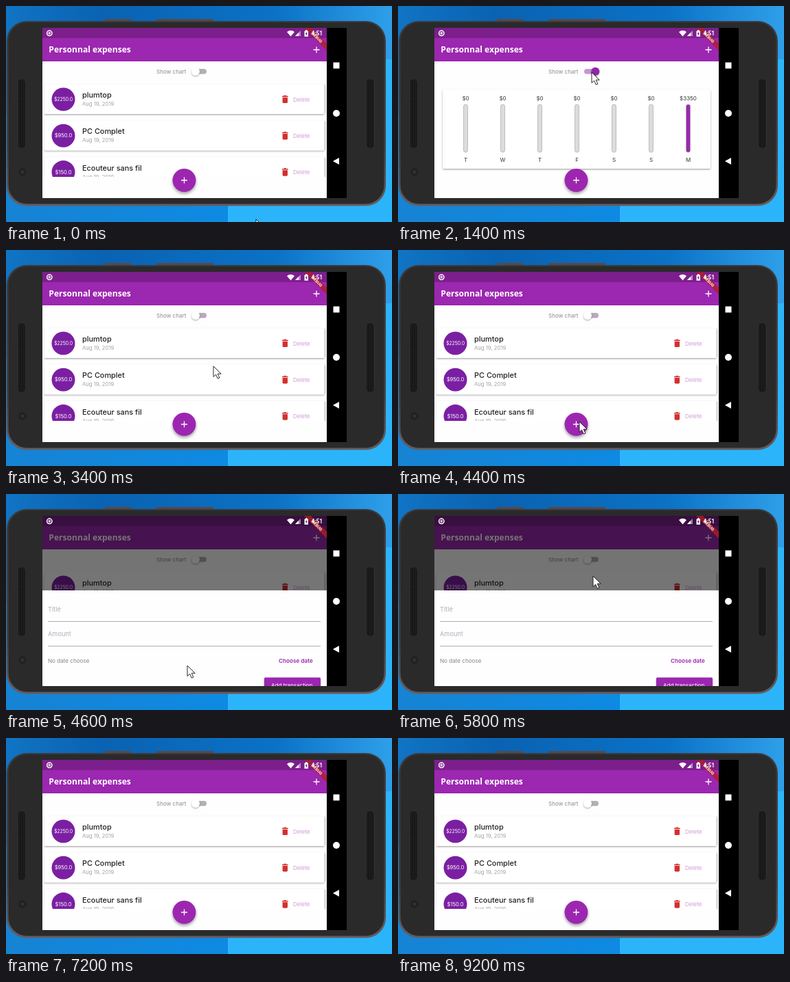
These frames come from a looping animation (562 by 316 pixels, 9.8 s). An HTML page:

```html
<!DOCTYPE html>
<html lang="en">
<head>
<meta charset="utf-8">
<title>Expense tracker demo</title>
<style>
  html, body { margin: 0; width: 100%; height: 100%; overflow: hidden; background: #0a6fc4; }
  svg { display: block; width: 100vw; height: 100vh; font-family: Inter, "Open Sans", sans-serif; }
</style>
</head>
<body>
<svg viewBox="0 0 562 316" xmlns="http://www.w3.org/2000/svg">
  <defs>
    <linearGradient id="skyTop" x1="0" y1="0" x2="1" y2="0">
      <stop offset="0" stop-color="#1174c4"/>
      <stop offset=".25" stop-color="#0a62b2"/>
      <stop offset=".7" stop-color="#0b72c6"/>
      <stop offset="1" stop-color="#2f9fe9"/>
    </linearGradient>
    <linearGradient id="skyBottom" x1="0" y1="0" x2="1" y2="0">
      <stop offset="0" stop-color="#1783d3"/>
      <stop offset=".6" stop-color="#0d8ae3"/>
    </linearGradient>
    <linearGradient id="rim" x1="0" y1="0" x2="0" y2="1">
      <stop offset="0" stop-color="#3b393a"/>
      <stop offset=".7" stop-color="#474445"/>
      <stop offset="1" stop-color="#665c60"/>
    </linearGradient>
    <pattern id="mesh" width="3" height="3" patternUnits="userSpaceOnUse">
      <rect width="3" height="3" fill="#171717"/>
      <circle cx="1.5" cy="1.5" r=".7" fill="#292929"/>
    </pattern>
    <filter id="soft" x="-30%" y="-30%" width="160%" height="170%">
      <feDropShadow dx="0" dy="1.2" stdDeviation="1.1" flood-color="#000" flood-opacity=".36"/>
    </filter>
    <filter id="deep" x="-40%" y="-40%" width="180%" height="190%">
      <feDropShadow dx="0" dy="2.5" stdDeviation="2.2" flood-color="#000" flood-opacity=".38"/>
    </filter>
    <clipPath id="screen"><rect x="53" y="32" width="414" height="249"/></clipPath>
    <clipPath id="listArea"><rect x="53" y="110" width="414" height="140"/></clipPath>
  </defs>

  <!-- desktop -->
  <rect width="562" height="158" fill="url(#skyTop)"/>
  <rect y="158" width="562" height="158" fill="url(#skyBottom)"/>
  <rect x="323" y="78" width="240" height="240" fill="#2cb4fa"/>

  <!-- phone -->
  <g fill="#56494b">
    <rect x="144" y="19" width="38" height="5" rx="1"/>
    <rect x="219" y="19" width="83" height="5" rx="1"/>
  </g>
  <rect x="1" y="22" width="552" height="270.500" rx="29" fill="url(#rim)"/>
  <rect x="3.500" y="24" width="547" height="265.500" rx="27" fill="#2b2a2a"/>
  <rect x="18.500" y="108" width="8.500" height="99" rx="3" fill="url(#mesh)" stroke="#151515"/>
  <rect x="526" y="108" width="8.500" height="99" rx="3" fill="url(#mesh)" stroke="#151515"/>
  <circle cx="24" cy="243" r="5" fill="#242424" stroke="#1c1c1c"/>
  <circle cx="24" cy="243" r="2" fill="#35343a"/>
  <rect x="53" y="32" width="443" height="249" fill="#000"/>
  <g fill="#fff">
    <rect x="476.500" y="82.500" width="9" height="9"/>
    <circle cx="481" cy="157" r="5"/>
    <path d="M476 227l9-5v10z"/>
  </g>

  <g clip-path="url(#screen)">
    <rect x="53" y="32" width="414" height="249" fill="#fefefe"/>

    <text x="219" y="98.800" font-size="8.100" fill="#8a8a8a">Show chart</text>
    <rect id="track" x="271" y="92" width="21" height="7.600" rx="3.800"/>
    <circle id="thumb" cy="95.800" r="6" filter="url(#soft)"/>

    <g id="list" clip-path="url(#listArea)"></g>
    <g id="chart">
      <rect x="65" y="122" width="390" height="116" rx="2" fill="#fff" filter="url(#soft)"/>
    </g>

    <rect x="53" y="32" width="414" height="49" fill="#9c27b0"/>
    <rect x="53" y="32" width="414" height="15" fill="#7c1f8c"/>
    <text x="62.300" y="68.300" font-family="'Open Sans', sans-serif" font-weight="700" font-size="12.100" fill="#fff">Personnal expenses</text>
    <path d="M447.500 64h9M452 59.500v9" stroke="#fff" stroke-width="1.300"/>

    <circle cx="259.500" cy="255" r="17" fill="#9c27b0" filter="url(#deep)"/>
    <path d="M255 255h9M259.500 250.500v9" stroke="#fff" stroke-width="1.300"/>

    <rect id="scrim" x="53" y="32" width="414" height="249" fill="#000"/>

    <g id="sheet">
      <rect x="53" width="414" height="200" fill="#fefefe"/>
      <g fill="#b0aebc" font-size="9.200">
        <text x="61" y="30.500">Title</text>
        <text x="61" y="66.500">Amount</text>
      </g>
      <path d="M61 45.500h397M61 81.500h397" stroke="#a6a6a6" stroke-width=".9"/>
      <text x="61" y="106" font-size="8.100" fill="#858585">No date choose</text>
      <text x="397" y="106" font-size="8.200" font-weight="600" fill="#9c27b0">Choose date</text>
      <rect x="376" y="127.500" width="82" height="22" rx="1.500" fill="#9c27b0" filter="url(#soft)"/>
      <text x="386" y="141.500" font-size="8.100" fill="#fff">Add transaction</text>
    </g>

    <g transform="translate(467 32) rotate(45)">
      <rect x="-24.300" y="16.500" width="48.600" height="6.800" fill="#b71c1c" fill-opacity=".75"/>
      <text y="22" font-size="5.600" font-weight="700" text-anchor="middle" fill="#fff">DEBUG</text>
    </g>

    <!-- status icons -->
    <g fill="#fff">
      <circle cx="63.300" cy="39.800" r="3.700" fill="none" stroke="#fff" stroke-width="1.500"/>
      <circle cx="63.300" cy="39.800" r="2" opacity=".75"/>
      <path d="M409 38q5.500-4.500 11 0l-5.500 6.500z"/>
      <path d="M429 36v8h-8z" opacity=".5"/>
      <path d="M426 39v5h-5z"/>
      <path d="M434.500 36.500h1.500v-1.200h2.500v1.200h1.500v8.300h-5.500z"/>
      <path d="M437.700 37.500l-2 3.500h1.300v2.500l2-3.500h-1.300z" fill="#7c1f8c"/>
      <text x="444.500" y="43.200" font-family="Roboto, sans-serif" font-weight="700" font-size="8.300">4:51</text>
    </g>
  </g>

  <path id="cursor" d="M0 0v15.500l3.600-3.300 2.700 6 2.600-1.200-2.700-5.800h5z" fill="#fff" stroke="#111" stroke-width=".9"/>
</svg>

<script>
const LOOP = 9800, STEP = 200;
const $ = id => document.getElementById(id);
const set = (node, attrs) => {
  for (const key in attrs) node.setAttribute(key, attrs[key]);
};

const expenses = [
  ['plumtop', '$2250.0', 6.9],
  ['PC Complet', '$950.0', 7.6],
  ['Ecouteur sans fil', '$150.0', 7.7]
];

$('list').innerHTML = expenses.map(([name, amount, size], i) => `
  <g transform="translate(0 ${i * 53.3})">
    <rect x="55.5" y="114.5" width="408" height="43.5" rx="2" fill="#fff" filter="url(#soft)"/>
    <path d="M464.5 115v42" stroke="#c4c4c4" stroke-width="1.4"/>
    <circle cx="83.500" cy="136.500" r="17" fill="#7b1fa2"/>
    <text x="83.500" y="139.200" font-size="${size}" text-anchor="middle" fill="#fff">${amount}</text>
    <text x="111" y="134" font-size="10.900" font-weight="500" fill="#222">${name}</text>
    <text x="111" y="146" font-size="7.700" fill="#a2a2a2">Aug 19, 2019</text>
    <path d="M402 131.500h2.500l.8-1h2l.8 1h2.500v1.400h-8.600zM402.600 133.700h7.400v7q0 1.400-1.400 1.400h-4.600q-1.400 0-1.400-1.400z" fill="#d32f2f"/>
    <text x="418" y="139.500" font-size="8.100" fill="#d29ad8">Delete</text>
  </g>`).join('');

$('chart').innerHTML += [...'TWTFSSM'].map((day, i) => {
  const x = 98.5 + i * 54, today = i === 6;
  return `
    <g font-size="8" text-anchor="middle" fill="#333">
      <text x="${x}" y="138">${today ? '$3350' : '$0'}</text>
      <rect x="${x - 3}" y="144" width="6" height="70" rx="3" fill="${today ? '#9c27b0' : '#dcdcdc'}" stroke="#9e9e9e" stroke-width=".6"/>
      <text x="${x}" y="228">${day}</text>
    </g>`;
}).join('');

// Pointer path: time, x, y
const pointer = [
  [0, 364, 312], [800, 282, 97], [2600, 282, 97], [3400, 302, 170], [3600, 302, 170],
  [4400, 264, 251], [4600, 264, 251], [5800, 284, 120], [6400, 284, 120],
  [7200, 372, 320], [8600, 372, 320], [8800, 113, 265], [9000, 89, 250],
  [9200, 372, 320], [LOOP, 372, 320]
];

function pointerAt(t) {
  const i = pointer.findIndex(key => key[0] > t);
  const [t0, x0, y0] = pointer[i - 1], [t1, x1, y1] = pointer[i];
  const p = (t - t0) / (t1 - t0), ease = p * p * (3 - 2 * p);
  return [x0 + (x1 - x0) * ease, y0 + (y1 - y0) * ease];
}

function render(time) {
  const t = Math.floor(time / STEP) * STEP;
  const within = (from, to) => t >= from && t < to;
  const show = (id, visible) => set($(id), { display: visible ? 'inline' : 'none' });

  const chartShown = within(1200, 2400), switchOn = within(1400, 2600);
  show('chart', chartShown);
  show('list', !chartShown);
  set($('thumb'), { cx: switchOn ? 287.4 : 276, fill: switchOn ? '#9125a8' : '#fff' });
  set($('track'), { fill: switchOn ? '#c795d1' : within(2600, 4600) ? '#bba6bf' : '#b1b1b1' });

  const open = within(4600, 6400), closing = within(6400, 6600);
  show('sheet', open || closing);
  set($('sheet'), { transform: `translate(0 ${open ? 141 : 259})` });
  set($('scrim'), { opacity: open ? 0.54 : closing ? 0.1 : 0 });

  set($('cursor'), { transform: `translate(${pointerAt(t)})` });
}

const start = performance.now();
function tick() {
  render((performance.now() - start) % LOOP);
  requestAnimationFrame(tick);
}
tick();
</script>
</body>
</html>
```
